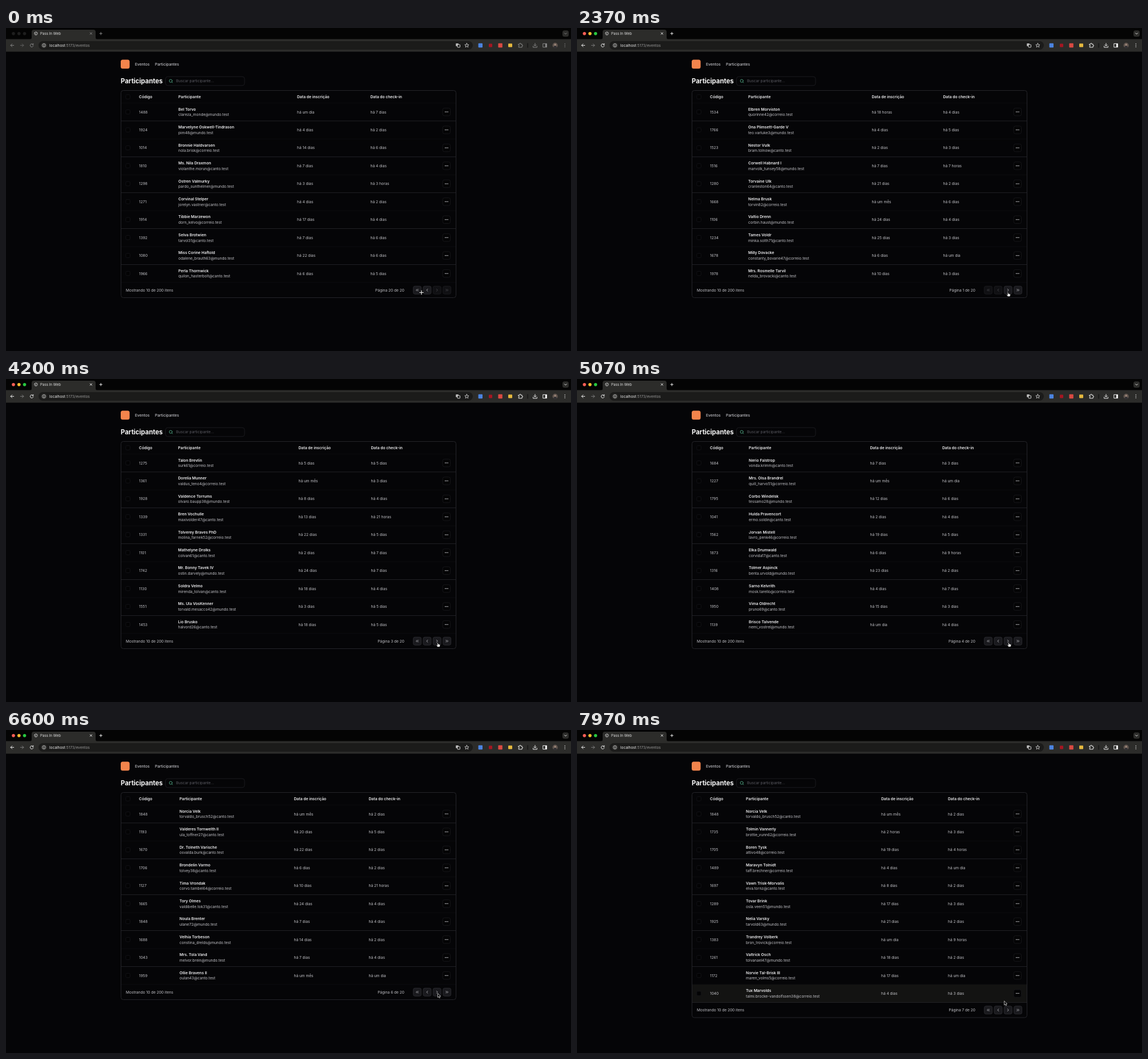
Write an HTML page that moves like this. It is 990 px wide and 566 px high and loops after 8 s.

```html
<!DOCTYPE html>
<html lang="pt-BR">
<head>
<meta charset="utf-8">
<title>Participantes</title>
<style>
  html, body { margin: 0; width: 100%; height: 100%; overflow: hidden; background: #050507; }
  svg { display: block; width: 990px; height: 566px; --ui: #ececec; --off: #7d7d7d; }
  svg.inactive { --ui: #858585; --off: #606060; }
  text { font: 6.6px Inter, sans-serif; fill: #c4c4c9; white-space: pre; }
  .strong { font-size: 6.76px; font-weight: 600; fill: #f1f1f3; }
  .medium { font-size: 6.7px; font-weight: 500; }
  .title { font-size: 11.35px; font-weight: 700; fill: #fafafa; }
  .hint { fill: #5c5c64; }
  .tab { font-size: 6.2px; fill: #e3e3e3; }
  .url { font-size: 6.55px; fill: #9a9a9a; }
  .line { fill: none; stroke: var(--ui); stroke-width: 1; stroke-linecap: round; stroke-linejoin: round; }
  .inactive .light { fill: #1e1e1e; }
</style>
</head>
<body>
<svg id="stage" viewBox="0 0 990 566">
  <g id="browser"></g>
  <g id="header"></g>
  <g id="table"></g>
  <g id="pointer"></g>
</svg>
<script>
const LOOP = 8000, ROW = 31.45, TOP = 131.3;
const STRIP = '#040404', TOOLBAR = '#2c2c2a', FIELD = '#1b1b1a';
const DOMAINS = { y: 'mundo.test', h: 'correio.test', g: 'canto.test' };

// Each page: start time, number, x of the three flexible columns, rows.
const pages = [
  [0, 20, [302, 510, 638.5], `1488,Bel Torvo,clareza_monde@y,um dia,7 dias
1924,Marvelyne Oskwell-Tindrason,pim48@y,4 dias,2 dias
1014,Bronnie Haldvarsen,nola.brisk@h,14 dias,6 dias
1810,Ms. Nila Draxmon,violanthe.morun@g,7 dias,4 dias
1298,Ostren Valmurky,pardo_sunthelmer@y,3 dias,3 horas
1271,Corvinal Stelper,jorelyn.vastner@g,4 dias,2 dias
1914,Tibbie Marzewon,dorn_kelvo@h,17 dias,4 dias
1392,Selva Brotwien,tarvol31@g,7 dias,6 dias
1080,Miss Corine Haftold,odalene_brauth63@y,22 dias,6 dias
1966,Perla Thornwick,quilon_hasterbolt@g,6 dias,5 dias`],
  [1720, 1, [300, 516.5, 641.5], `1534,Elbren Morviston,quorinne42@h,18 horas,4 dias
1766,Ona Plimsett-Garde V,teo.varluke3@y,4 dias,5 dias
1523,Nestor Vulk,bram.tolnow@g,2 dias,3 dias
1516,Corwell Habnard I,marvolk_tunsey58@y,7 dias,7 horas
1280,Torvaine Ulk,cranleston64@g,21 dias,2 dias
1668,Nelma Brusk,torvin82@h,um mês,6 dias
1106,Valtio Drenn,corbin.haust@y,24 dias,4 dias
1234,Tames Voldr,minka.solth71@g,25 dias,3 dias
1678,Milly Dovacke,constanty_bovarie47@h,6 dias,um dia
1978,Mrs. Rosmelle Tarvil,nelda_brovacki@g,10 dias,3 dias`],
  [3400, 2, [301, 514, 640], `1417,Orlan Meskwit,tilda.varn@h,9 dias,2 dias
1852,Wenna Crastol,brumo_selk27@g,3 dias,6 dias
1209,Dr. Palo Venstrik,hestia44@y,um dia,4 dias
1633,Lorvin Achterby,nando.plusk@g,16 dias,5 dias
1745,Isolma Trevanck,vesper_olm18@h,11 dias,um dia
1062,Barto Quenzel,mirta.folgen@y,um mês,3 dias
1590,Ulma Persewick,tolvar73@g,20 dias,7 dias
1328,Renko Haddelby,celma_drost@h,5 dias,2 dias
1911,Mr. Emlo Varstad,pilo.grent62@y,13 dias,6 dias
1176,Yvra Mondelke,sorna35@g,8 dias,5 horas`],
  [4070, 3, [301.5, 512.5, 639.5], `1275,Talon Brevlin,surk61@h,5 dias,5 dias
1361,Dorelia Munner,valdus_teno4@h,um mês,3 dias
1928,Valdence Torrums,olvaro.baupp38@y,8 dias,4 dias
1339,Bren Vochulle,maxivolder47@g,13 dias,21 horas
1331,Tolverey Braves PhD,molina_farnek52@h,22 dias,5 dias
1101,Mathelyne Drolks,colvan61@g,2 dias,7 dias
1742,Mr. Bonny Tavek IV,ostin.darvely@y,24 dias,7 dias
1130,Soldra Velmo,mirenda_tolvan@g,18 dias,4 dias
1551,Ms. Ula VosKenner,torvald.mesacco42@y,3 dias,5 dias
1453,Lio Brusko,halvord26@g,18 dias,5 dias`],
  [4850, 4, [301, 513.5, 640], `1684,Nerio Falstrop,vonda.krimm@g,7 dias,3 dias
1227,Mrs. Olsa Brandrel,quill_harvo51@h,um mês,um dia
1795,Corbo Windelsk,tessamo28@y,12 dias,6 dias
1041,Hulda Pravencort,ermo.soldin@g,2 dias,4 dias
1562,Jorvan Mistell,lavro_penk46@h,19 dias,5 dias
1873,Elka Drumwald,corvida17@g,6 dias,9 horas
1316,Tolmer Aspinck,benta.urvold@y,23 dias,2 dias
1408,Sarno Kelvrith,mosk.tarello@h,4 dias,7 dias
1950,Vima Oldrecht,pruno69@g,15 dias,3 dias
1139,Brisco Talvende,nemi_vostrel@y,um dia,4 dias`],
  [5520, 5, [301, 514.5, 640.5], `1076,Tobbie Valk,torna26@h,um dia,um dia
1134,Osvelno Mudahl,brask.tolvmann48@h,um dia,4 dias
1303,Dr. Corvick Hansholder,mirella_vogtunn35@y,um mês,5 horas
1979,Uma Varde,solenne51@g,5 dias,2 dias
1534,Brondelick Vask,tamelle.brodenstick@h,20 dias,6 dias
1843,Tyrna Dolmer,osvaldi62@y,9 dias,6 dias
1256,Nelva Torner,nilvo.tauros28@g,12 dias,4 dias
1197,Bickie Voolder,astrey.molver@g,17 dias,3 dias
1103,Talhen Broston,daven41@y,18 dias,4 dias
1005,Tyron VanMulder,brunne37@g,um dia,4 dias`],
  [6270, 6, [304, 504.5, 635.5], `1848,Norcia Velk,torvaldo_brusch52@g,um mês,2 dias
1193,Valderes Tornwelth II,ula_toffner27@g,20 dias,5 dias
1670,Dr. Tolneth Varische,osvalda.burk@g,22 dias,2 dias
1706,Brondelin Varmo,tolvey38@g,6 dias,2 dias
1127,Tima Vrondak,corvo.tambel64@h,10 dias,21 horas
1665,Tory Olmes,valdibelle.tok31@g,24 dias,4 dias
1848,Noula Brenter,ulane72@y,7 dias,4 dias
1688,Velhia Torbeson,constina_drelds@y,14 dias,2 dias
1043,Mrs. Tola Vand,melvor.brein@y,7 dias,4 dias
1959,Ollie Bravens II,oulan43@g,um mês,um dia`],
  [7030, 7, [296, 533, 650], `1848,Norcia Velk,torvaldo_brusch52@g,um mês,2 dias
1735,Tolmin Vannerly,brottie_vunn62@h,2 horas,3 dias
1705,Boren Tysk,attivo48@h,19 dias,4 horas
1489,Maravyn Tolnidt,taff.brechner@h,4 dias,um dia
1697,Vawn Trisk-Morvalis,elva.tornz@g,8 dias,2 dias
1289,Tovar Brink,osla.veen51@y,17 dias,3 dias
1925,Nelia Varsky,tarvold63@y,21 dias,2 dias
1383,Trandrey Volberk,bron_trovick@h,um dia,9 horas
1261,Valtrick Osch,tolvanael47@y,18 dias,2 dias
1172,Norvie Tal-Brisk III,maren_volms5@h,17 dias,um dia
1040,Tux Marvolds,talmi.brocke-vandolfssen38@h,4 dias,3 dias`]
].map(([start, number, columns, rows]) =>
  ({ start, number, columns, rows: rows.split('\n').map(row => row.split(',')) }));

// Pointer keys: time, x, y, shape.
const track = [
  [0, 728, 463.5, 'cross'], [870, 728, 463.5, 'arrow'], [1200, 722.8, 461, 'arrow'],
  [1800, 722.8, 461, 'arrow'], [2350, 755.2, 463, 'hand'], [3270, 755.2, 463, 'hand'],
  [3800, 756.5, 462, 'hand'], [6450, 756.5, 461.5, 'arrow'], [7300, 756.5, 461.5, 'arrow'],
  [7850, 748.6, 474.8, 'arrow'], [LOOP, 748.6, 474.8, 'arrow']
];

const shapes = {
  cross: '<path d="M-4 0H4M0-4V4" stroke="#111" stroke-width="2.4"/><path d="M-3.8 0H3.8M0-3.8V3.8" stroke="#eee" stroke-width="1.2"/>',
  arrow: '<path d="M0 0V7.2L1.7 5.7L2.8 8.2L4 7.7L2.9 5.2H5.2Z" fill="#080808" stroke="#e8e8e8" stroke-width=".7"/>',
  hand: '<path d="M-1 .6Q-.4-.6.3.5L.7 2.6Q1.6 2 2 2.9Q2.9 2.5 3.2 3.4Q4.3 3.1 4.2 4.5Q4.2 6.2 3.2 7.6H-.3L-2.4 4.8Q-2.6 3.7-1.4 4.2L-.6 4.8Z" fill="#f2f2f2" stroke="#111" stroke-width=".6"/>'
};

const icons = {
  first: 'm11 17-5-5 5-5m7 10-5-5 5-5', previous: 'm15 18-6-6 6-6',
  next: 'm9 18 6-6-6-6', last: 'm6 17 5-5-5-5m7 10 5-5-5-5',
  search: 'm21 21-4.3-4.3M19 11a8 8 0 1 1-16 0a8 8 0 0 1 16 0'
};

const $ = id => document.getElementById(id);
const text = (x, y, content, cls = '', extra = '') => `<text x="${x}" y="${y}" class="${cls}" ${extra}>${content}</text>`;
const rect = (x, y, w, h, fill, r = 0, stroke = 'none') =>
  `<rect x="${x}" y="${y}" width="${w}" height="${h}" rx="${r}" fill="${fill}" stroke="${stroke}"/>`;
const circle = (x, y, r, fill, extra = '') => `<circle cx="${x}" cy="${y}" r="${r}" fill="${fill}" ${extra}/>`;
const line = (d, extra = '') => `<path class="line" d="${d}" ${extra}/>`;
const icon = (name, x, y, color) =>
  `<path d="${icons[name]}" transform="translate(${x} ${y}) scale(.322) translate(-12 -12)" fill="none" stroke="${color}" stroke-width="2.2" stroke-linecap="round" stroke-linejoin="round"/>`;

function drawBrowser() {
  const lights = ['#ff5f57', '#febc2e', '#28c840'];
  return rect(0, 0, 990, 20, STRIP) + rect(0, 19.5, 990, 22, TOOLBAR) +
    `<path d="M42 20Q45 20 45 16V7Q45 3 49 3H153Q157 3 157 7V16Q157 20 160 20Z" fill="${TOOLBAR}"/>` +
    lights.map((color, i) => circle(13 + i * 9.75, 9.7, 2.8, color, 'class="light"')).join('') +
    circle(52.4, 9.6, 2.7, 'none', 'stroke="#c8c8c8" stroke-width=".8"') +
    line('M50 8.6L52 9.4L52.4 11.8M52.6 7.2L54.8 9.2', 'style="stroke:#c8c8c8;stroke-width:.8"') +
    text(60, 11.8, 'Pass In Web', 'tab') +
    line('M147.3 8L150.5 11.2M150.5 8L147.3 11.2M164 9.7H168.4M166.2 7.5V11.9') +
    rect(975, 4.3, 11, 11, TOOLBAR, 3.5) + line('M978.6 8.9L980.5 10.8L982.4 8.9') +
    line('M13.7 30.4H8.2M10.7 27.8L8.1 30.4L10.7 33') +
    line('M25.3 30.4H30.8M28.3 27.8L30.9 30.4L28.3 33', 'style="stroke:var(--off)"') +
    line('M47.4 28.8A2.8 2.8 0 1 0 47.9 31.1M47.8 27.3V29.2H45.8') +
    rect(57, 23, 761, 15, FIELD, 7.5) + circle(66.5, 30.4, 5.2, TOOLBAR) +
    circle(66.5, 30.4, 2.9, 'none', 'stroke="#ddd" stroke-width=".8"') +
    line('M66.5 30.3V31.8M66.5 28.8V28.9', 'style="stroke:#ddd;stroke-width:.8"') +
    text(76, 32.8, '<tspan fill="#f0f0f0">localhost</tspan>:5173/eventos', 'url') +
    rect(788.2, 27, 4.6, 4.8, '#bbb', .6) + rect(791, 29.1, 4.5, 4.7, FIELD, .6, '#d4d4d4') +
    line('M807.4 26.8L808.4 29.2L811 29.4L809 31.1L809.7 33.7L807.4 32.2L805.1 33.7L805.8 31.1L803.8 29.4L806.4 29.2Z', 'style="stroke:#ddd;stroke-width:.8"') +
    rect(827.6, 26.8, 7.4, 7.4, '#4b83df', 1) + rect(846, 27.4, 6, 6, '#a51622', 1) +
    rect(862.4, 26.8, 7.4, 7.4, '#d94a42', 1) + rect(880, 27.2, 7, 6.4, '#e5b93e', 1) +
    line('M898.2 28.2H900Q899.8 26.6 901 26.6Q902.2 26.6 902 28.2H904.1V30Q905.5 29.8 905.5 30.9Q905.5 32 904.1 31.8V33.8H898.2V32Q899.5 31.9 899.5 30.9Q899.5 30 898.2 30Z') +
    rect(913.6, 26.5, 1, 8, '#0c0c0c') +
    line('M927 26.8V31.4M924.9 29.4L927 31.5L929.1 29.4M923.6 31.8V33.9H930.4V31.8') +
    line('M941.2 27.4H947.5V33.6H941.2Z') + rect(944.8, 27.4, 2.7, 6.2, 'var(--ui)') +
    circle(962.2, 30.4, 4.6, '#61564f') + circle(962.2, 29.2, 1.6, '#a08a7c') +
    `<path d="M959 33.6Q962.2 29.5 965.4 33.6Q962.2 36 959 33.6" fill="#292a30"/>` +
    [27.8, 30.4, 33].map(y => circle(979.3, y, .7, 'var(--ui)')).join('');
}

function drawHeader() {
  return rect(201, 55.6, 15.6, 15.6, '#f3844c', 3.5) +
    text(226, 65.8, 'Eventos', 'medium') + text(261, 65.8, 'Participantes', 'medium') +
    text(201, 97.3, 'Participantes', 'title') +
    rect(279.5, 85.2, 138.5, 15.6, 'none', 4, '#1a1a1e') + icon('search', 289, 93, '#62cfa3') +
    text(298, 95.4, 'Buscar participante...', 'hint');
}

const checkbox = y => rect(209.9, y - 3.7, 7.4, 7.4, '#030304', 1.8, '#131317');

function drawRow([code, name, email, joined, checkedIn], i, [person, date, check]) {
  const y = TOP + i * ROW + 15.8;
  const [user, domain] = email.split('@');
  const hovered = i === 10 ? rect(202, y - 15.5, 586, 31, '#131312') : '';
  return hovered + checkbox(y) + text(233, y + 2.4, code) +
    text(person, y - 2.4, name, 'strong') + text(person, y + 7.3, `${user}@${DOMAINS[domain]}`) +
    text(date, y + 2.4, 'há ' + joined) + text(check, y + 2.4, 'há ' + checkedIn) +
    rect(765.2, y - 6.7, 13.4, 13.4, '#040405', 3, '#161619') +
    [-2.2, 0, 2.2].map(dx => circle(771.9 + dx, y, .75, '#dedee2')).join('') +
    rect(202, y + 15.4, 586, .8, i % 2 ? '#0e0e11' : '#28282d');
}

function drawTable({ number, columns, rows }) {
  const end = TOP + rows.length * ROW, y = end + 13.5;
  const labels = ['Participante', 'Data de inscrição', 'Data do check-in'];
  const buttons = Object.keys(icons).slice(0, 4).map((name, i) => {
    const x = 720.6 + i * 17.35, enabled = i < 2 ? number > 1 : number < 20;
    return rect(x - 7, y - 7, 14, 14, enabled ? '#1a1a1e' : '#101013', 3, enabled ? '#29292d' : '#1a1a1d') +
      icon(name, x, y, enabled ? '#d8d8dc' : '#55555b');
  });
  return checkbox(120.6) + text(233, 122.9, 'Código', 'strong') +
    labels.map((label, i) => text(columns[i], 122.9, label, 'strong')).join('') +
    rect(202, TOP, 586, .7, '#0e0e11') +
    rows.map((row, i) => drawRow(row, i, columns)).join('') +
    rect(201.5, 109.5, 587, end - 109.5 + 26.7, 'none', 4, '#242429') +
    text(210, y + 2.4, 'Mostrando 10 de 200 itens') +
    text(698, y + 2.4, `Página ${number} de 20`, '', 'text-anchor="end"') + buttons.join('');
}

function pointerAt(t) {
  const i = track.findLastIndex(key => key[0] <= t);
  const [t0, x0, y0, shape] = track[i];
  const [t1, x1, y1] = track[i + 1];
  const p = (t - t0) / (t1 - t0), ease = p * p * (3 - 2 * p);
  return { x: x0 + (x1 - x0) * ease, y: y0 + (y1 - y0) * ease, shape };
}

let shownPage, shownShape;
function render(now) {
  const t = now % LOOP;
  const page = pages.findLast(item => item.start <= t);
  if (page !== shownPage) $('table').innerHTML = drawTable(shownPage = page);
  $('stage').classList.toggle('inactive', t < 400);
  const { x, y, shape } = pointerAt(t);
  if (shape !== shownShape) $('pointer').innerHTML = shapes[shownShape = shape];
  $('pointer').setAttribute('transform', `translate(${x} ${y})`);
}

$('browser').innerHTML = drawBrowser();
$('header').innerHTML = drawHeader();
const began = performance.now();
function tick() {
  render(performance.now() - began);
  requestAnimationFrame(tick);
}
tick();
</script>
</body>
</html>
```
